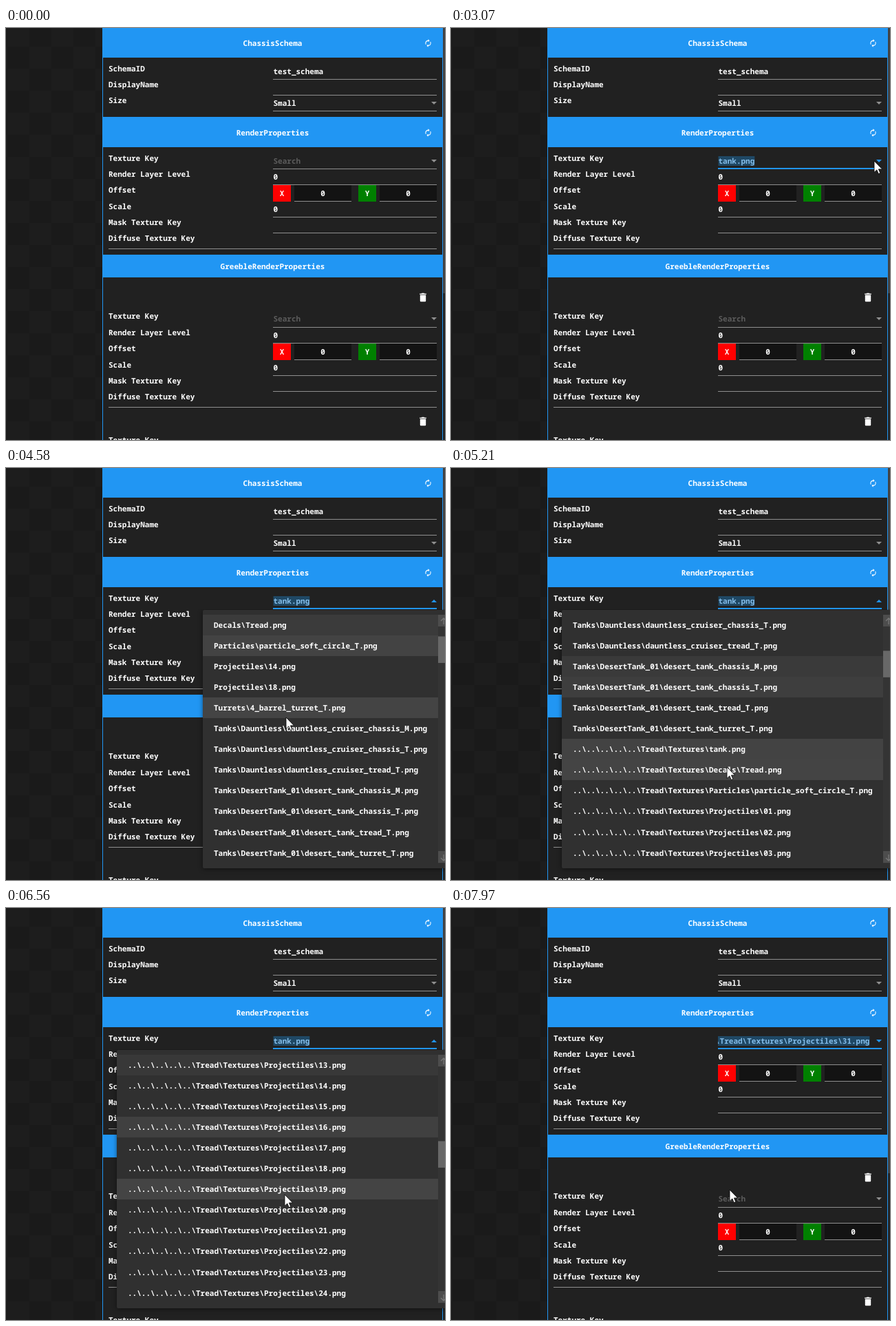
An HTML page for the animation above (8 s loop, 638 by 598 pixels).

```html
<!DOCTYPE html>
<html lang="en">
<head>
<meta charset="utf-8">
<title>Schema editor</title>
<style>
html, body { margin: 0; width: 100%; height: 100%; overflow: hidden; background: #1a1a1a; }
svg { display: block; width: 638px; height: 598px; }
text { font: bold 11px "Noto Sans Mono", "DejaVu Sans Mono", monospace; fill: #fff; text-rendering: geometricPrecision; white-space: pre; }
</style>
</head>
<body>
<svg id="stage" viewBox="0 0 638 598" xmlns="http://www.w3.org/2000/svg"></svg>
<script>
const LOOP = 8000, BLUE = '#2196f3', GREY = '#8f8f8f', ROW = 30.05, VISIBLE = 12;
const stage = document.getElementById('stage');

function add(parent, tag, attrs = {}, content) {
  const el = document.createElementNS('http://www.w3.org/2000/svg', tag);
  set(el, attrs);
  if (content !== undefined) el.textContent = content;
  parent.appendChild(el);
  return el;
}
function set(el, attrs) {
  for (const k in attrs) el.setAttribute(k, attrs[k]);
}
const rect = (p, x, y, width, height, fill, more) => add(p, 'rect', { x, y, width, height, fill, ...more });
// y is the vertical middle of the text
const label = (p, x, y, s, more) => add(p, 'text', { x, y: y + 4, ...more }, s);
const centred = (p, x, y, s) => label(p, x, y, s, { 'text-anchor': 'middle' });
const rule = (p, y, x = 388) => rect(p, x, y, 626 - x, 1, GREY);
const triangle = (p, y, fill) => add(p, 'path', { d: `M618 ${y - 2}h8l-4 4z`, fill });
const show = (el, on) => el.setAttribute('display', on ? 'inline' : 'none');
const clamp = v => Math.max(0, Math.min(1, v));
const ease = v => { v = clamp(v); return v * v * (3 - 2 * v); };

// ---- static page ----
const page = add(stage, 'g');
rect(page, 0, 0, 638, 598, '#1a1a1a');
for (let r = 0; r < 20; r++)
  for (let c = 0; c < 6; c++)
    if ((r + c) % 2) rect(page, 2 + 32 * (c - 1), 27 + 32 * (r - 1), 32, 32, '#1d1d1d');
rect(page, 635, 0, 3, 385, '#424242');
rect(page, 635, 385, 3, 213, '#242424');
rect(page, 140, 0, 495, 598, BLUE);
for (const [y, h] of [[43, 86], [173, 156], [362, 236]]) rect(page, 141, y, 493, h, '#212121');

const REFRESH = 'M12 6v3l4-4-4-4v3c-4.42 0-8 3.58-8 8 0 1.57.46 3.03 1.24 4.26L6.7 14.8c-.45-.83-.7-1.79-.7-2.8 0-3.31 2.69-6 6-6zm6.76 1.74L17.3 9.2c.44.84.7 1.79.7 2.8 0 3.31-2.69 6-6 6v-3l-4 4 4 4v-3c4.42 0 8-3.58 8-8 0-1.57-.46-3.03-1.24-4.26z';
const BIN = 'M6 19c0 1.1.9 2 2 2h8c1.1 0 2-.9 2-2V7H6v12zM19 4h-3.5l-1-1h-5l-1 1H5v2h14V4z';
const icon = (d, x, y, s) => add(page, 'path', { d, fill: '#fff', transform: `translate(${x} ${y}) scale(${s}) translate(-12 -12)` });

centred(page, 387.5, 22, 'ChassisSchema');
centred(page, 387.5, 152, 'RenderProperties');
centred(page, 387.5, 346, 'GreebleRenderProperties');
icon(REFRESH, 613.5, 22, .52);
icon(REFRESH, 613.5, 152, .52);
icon(BIN, 606, 391, .7);
icon(BIN, 606, 571, .7);

['SchemaID', 'DisplayName', 'Size'].forEach((s, i) => label(page, 149, 59 + 23 * i, s));
label(page, 388.5, 63, 'test_schema');
label(page, 388.5, 109, 'Small');
[74, 97, 120].forEach(y => rule(page, y));
triangle(page, 109, GREY);

function axis(x, y, name, fill) {
  rect(page, x, y, 26, 24, fill);
  centred(page, x + 13, y + 12, name);
  rect(page, x + 31, y, 83, 24, '#131313');
  rect(page, x + 31, y + 23, 83, 1, GREY);
  centred(page, x + 72.5, y + 11.5, '0');
}
function renderGroup(dy) {
  const names = ['Render Layer Level', 'Offset', 'Scale', 'Mask Texture Key', 'Diffuse Texture Key'];
  [212, 235, 259, 282, 305].forEach((y, i) => label(page, 149, y + dy, names[i]));
  label(page, 149, dy ? 418 : 189, 'Texture Key');
  [204, 227, 274, 297].forEach(y => rule(page, y + dy));
  rule(page, 320 + dy, 149);
  label(page, 388.5, 216 + dy, '0');
  label(page, 388.5, 263 + dy, '0');
  axis(388, 228 + dy, 'X', '#ff0000');
  axis(512, 228 + dy, 'Y', '#008000');
}
renderGroup(0);
renderGroup(230);
label(page, 388.5, 422, 'Search', { style: 'fill:#5c5c5c' });
triangle(page, 422, GREY);
label(page, 149, 598, 'Texture Key');

// ---- texture key field ----
const field = add(stage, 'g');
const clip = add(add(stage, 'clipPath', { id: 'box' }), 'rect', { x: 388, y: 180, width: 221, height: 24 });
const hoverLine = rect(field, 388, 204, 238, 1, BLUE);
const focusLine = rect(field, 388, 203, 238, 2, BLUE);
const hint = label(field, 388.5, 193, 'Search', { style: 'fill:#5c5c5c' });
const value = add(field, 'g', { 'clip-path': 'url(#box)' });
const marked = rect(value, 388, 186, 0, 14, '#1f4865');
const plain = label(value, 388.5, 193, '');
const chosen = label(value, 388.5, 193, '', { style: 'fill:#84bce8' });
const arrow = add(field, 'path');
const caret = rect(field, 388, 186, 1, 14, '#fff');

// ---- drop-down ----
const deep = '..\\'.repeat(5) + 'Tread\\Textures\\';
const files = ['tank', 'TiledBackground', 'white_arrow', 'Decals\\Tread', 'Particles\\particle_soft_circle_T',
  'Projectiles\\14', 'Projectiles\\18', 'Turrets\\4_barrel_turret_T'];
for (const s of ['chassis_M', 'chassis_T', 'tread_T']) files.push('Tanks\\Dauntless\\dauntless_cruiser_' + s);
for (const s of ['chassis_M', 'chassis_T', 'tread_T', 'turret_T']) files.push('Tanks\\DesertTank_01\\desert_tank_' + s);
for (const s of ['tank', 'Decals\\Tread', 'Particles\\particle_soft_circle_T']) files.push(deep + s);
for (let n = 1; n <= 40; n++) files.push(deep + 'Projectiles\\' + String(n).padStart(2, '0'));
const PICK = 48;

const reveal = add(add(stage, 'clipPath', { id: 'reveal' }), 'rect', { x: 140, y: 205, width: 498, height: 393 });
const popup = add(stage, 'g', { 'clip-path': 'url(#reveal)' });
const sheet = rect(popup, 286, 206, 360, 375, '#303030', { rx: 2, style: 'filter:drop-shadow(0 1px 3px rgba(0,0,0,.5))' });
const rows = Array.from({ length: VISIBLE }, (_, i) => ({
  back: rect(popup, 286, Math.round(213 + ROW * i), 342, 30, '#303030'),
  text: label(popup, 302, Math.round(228 + ROW * i), '')
}));
rect(popup, 628, 213, 10, 361, '#343434');
const thumb = rect(popup, 628, 234, 10, 38.5, '#686868');
for (const [y, d] of [[213, 'M632 222l4-4 4 4M636 218v9'], [556, 'M632 566l4 4 4-4M636 570v-9']]) {
  rect(popup, 628, y, 10, 17, '#4d4d4d');
  add(popup, 'path', { d, fill: 'none', stroke: '#777', 'stroke-width': 1.3 });
}

// ---- pointer ----
const pointer = add(stage, 'path', { d: 'M0 0V16.5L3.8 12.9L6.3 18.6L8.8 17.5L6.4 11.9H11.6Z', fill: '#fff', stroke: '#000', 'stroke-width': .8 });
const beam = add(stage, 'path', { d: 'M-3 -7.5H-1L0 -6.5L1 -7.5H3M0 -6.5V6.5M-3 7.5H-1L0 6.5L1 7.5H3', fill: 'none', stroke: '#fff', 'stroke-width': 1.2 });

// ---- timeline ----
const path = [
  [80, 482, 602], [850, 463, 201], [1920, 463, 201], [2040, 490, 200], [2190, 490, 200],
  [2310, 512, 183], [2430, 517, 188], [2610, 517, 188], [2950, 618, 209], [3090, 615, 192],
  [3420, 613, 192], [3660, 593, 193], [4040, 440, 262], [4250, 418, 318], [4400, 410, 338],
  [4580, 407, 362], [4840, 405, 385], [5400, 400, 452], [5750, 400, 460], [5920, 400, 438],
  [6290, 404, 416], [6780, 405, 416], [6960, 406, 437], [7080, 406, 437], [7180, 405, 409]
];
const wheel = [4530, 4780, 5050, 5300, 5550, 6000, 6100, 6200, 6280, 6450, 6620, 6780, 7010, 7160];
const WIDE = wheel[1], OPEN = 3250, CLICK = 7330, CLOSE = 7440;

function mouseAt(t) {
  if (t <= path[0][0]) return path[0].slice(1);
  const i = path.findIndex(p => p[0] > t);
  if (i < 0) return path[path.length - 1].slice(1);
  const [t0, x0, y0] = path[i - 1], [t1, x1, y1] = path[i];
  const k = ease((t - t0) / (t1 - t0));
  return [x0 + (x1 - x0) * k, y0 + (y1 - y0) * k];
}
const topAt = t => 3 * wheel.filter(w => w <= t).length;
function hovered(t) {
  const [, y] = mouseAt(t), row = Math.floor((y - 213) / ROW);
  return t > 3700 && row >= 0 && row < VISIBLE ? topAt(t) + row : -1;
}

// Highlights fade out over 400 ms after the pointer leaves an item
function glows(t) {
  const glow = {};
  for (let age = 0; age < 400; age += 10) {
    const i = hovered(t - age);
    if (!(i in glow)) glow[i] = Math.min(1, 1.1 - age / 400);
  }
  return glow;
}
const grey = v => `rgb(${[v, v, v].map(Math.round)})`;

function drawField(t, overField) {
  const open = t >= OPEN && t < CLOSE;
  const focus = ease((t - 900) / 280);
  show(hoverLine, overField || focus > 0);
  set(focusLine, { x: 507 - 119 * focus, width: 238 * focus });
  show(hint, t < 1300);
  show(caret, t >= 920 && t < 1300);
  let full = 'tank.png', from = 1;
  if (t < 1300) full = '';
  else if (t >= CLOSE) { full = files[PICK] + '.png'; from = 0; }
  else if (t >= 3070) from = 0;
  else if (t >= 2230) from = full.length;
  else if (t >= 1490) from = 2;
  const x = t >= CLOSE ? 608.4 - 6.6 * full.length : 388.5;
  const mid = x + 6.6 * from;
  plain.textContent = full.slice(0, from);
  chosen.textContent = full.slice(from);
  set(plain, { x });
  set(chosen, { x: mid });
  set(marked, { x: mid, width: 6.6 * (full.length - from) });
  set(arrow, { d: open ? 'M618 195h8l-4-4z' : 'M618 191h8l-4 4z', fill: overField || focus > 0 ? BLUE : GREY });
}

function drawPopup(t) {
  const fade = 1 - clamp((t - CLOSE) / 200);
  show(popup, t >= OPEN && fade > 0);
  if (t < OPEN || fade === 0) return;
  const grow = ease((t - OPEN) / 260);
  set(popup, { opacity: fade * clamp((t - OPEN) / 120) });
  set(reveal, { height: 393 * grow });
  const left = t >= WIDE ? 161 : 286, top = topAt(t), glow = glows(t);
  set(sheet, { x: left, width: 646 - left });
  set(thumb, { y: 234 + 3.48 * top });
  rows.forEach(({ back, text }, i) => {
    const item = top + i;
    let shade = 48 + 20 * (glow[item] || 0);
    if (item === 0) shade = Math.max(shade, 84);
    if (item === PICK && t > CLICK) shade += 16 * clamp((t - CLICK) / 100);
    set(back, { x: left, width: 628 - left, fill: grey(shade) });
    set(text, { x: left + 16 });
    text.textContent = files[item] + '.png';
  });
}

function draw(t) {
  const [x, y] = mouseAt(t).map(Math.round);
  const overField = x >= 388 && x <= 626 && y >= 181 && y <= 205;
  const typing = overField && x < 609;
  drawField(t, overField);
  drawPopup(t);
  show(beam, typing && t >= 80);
  show(pointer, !typing && t >= 80);
  set(typing ? beam : pointer, { transform: `translate(${x} ${y})` });
}

const start = performance.now();
function tick() {
  draw((performance.now() - start) % LOOP);
  requestAnimationFrame(tick);
}
draw(0);
requestAnimationFrame(tick);
</script>
</body>
</html>
```
